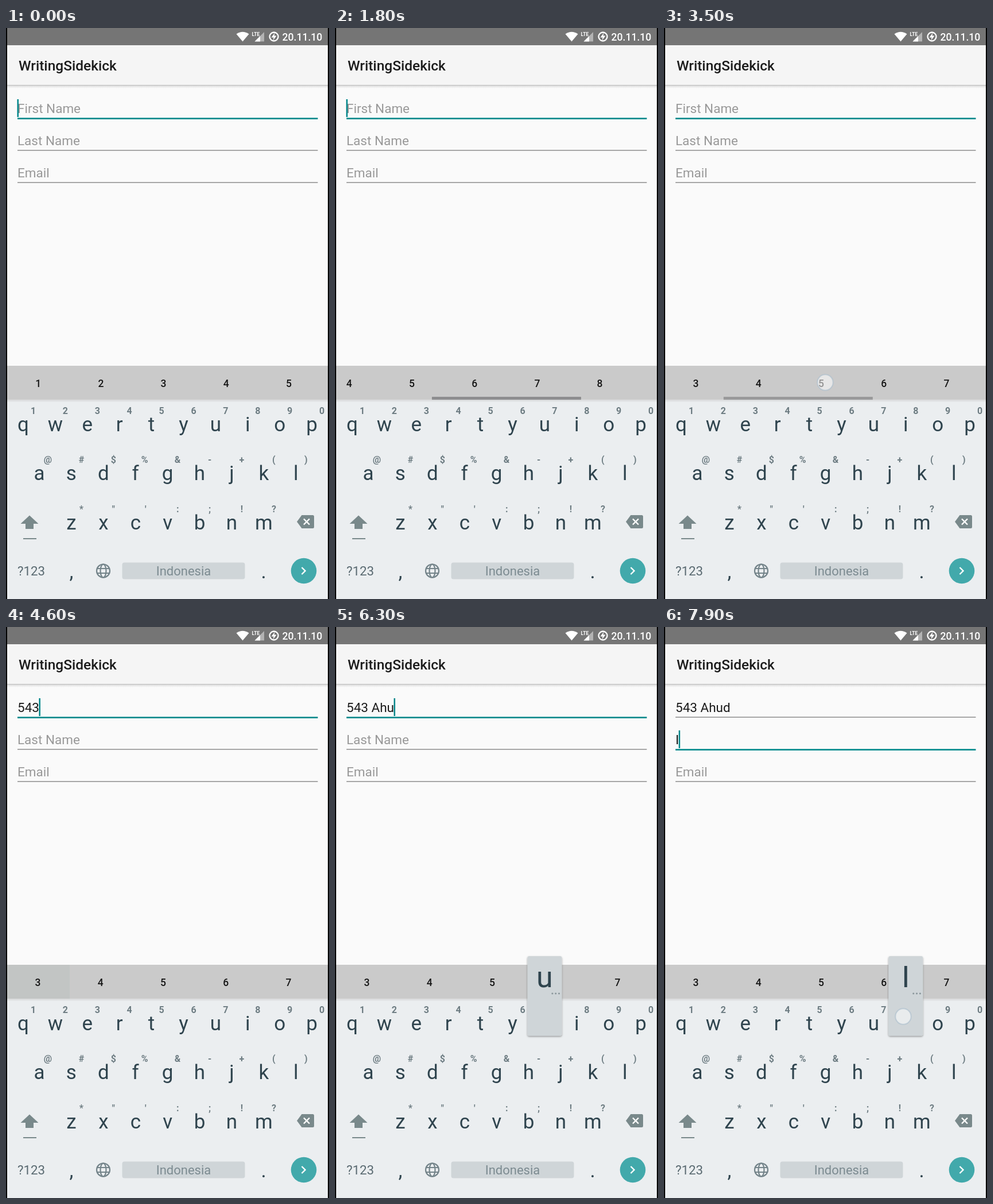
These frames come from a looping animation (563x994 px, 8 s). An HTML page:

```html
<!DOCTYPE html>
<html lang="en">
<head>
<meta charset="utf-8">
<title>Form with keyboard</title>
<style>
html, body { margin: 0; width: 100%; height: 100%; overflow: hidden; background: #000; }
svg { display: block; width: 100vw; height: 100vh; font-family: Roboto, sans-serif; }
text { white-space: pre; }
.mid { text-anchor: middle; }
.edit { font-size: 22.5px; }
.key { font-size: 35px; fill: #2f444e; }
.hint { font-size: 16px; font-weight: 700; fill: #6d7c82; }
.tip { font-size: 17.5px; font-weight: 500; fill: #161616; }
</style>
</head>
<body>
<svg id="stage" viewBox="0 0 563 994" preserveAspectRatio="none">
  <defs>
    <linearGradient id="barShade" x2="0" y2="1">
      <stop offset="0" stop-color="#bdbdbd"/><stop offset=".4" stop-color="#e4e4e4"/><stop offset="1" stop-color="#fafafa"/>
    </linearGradient>
    <linearGradient id="keyShade" x2="0" y2="1">
      <stop offset="0" stop-color="#d6d7d8"/><stop offset="1" stop-color="#ebeef0"/>
    </linearGradient>
    <filter id="drop" x="-20%" y="-20%" width="140%" height="140%">
      <feDropShadow dx="0" dy="1.5" stdDeviation="1.6" flood-opacity=".4"/>
    </filter>
    <clipPath id="stripBox"><rect x="2" y="588" width="559" height="60"/></clipPath>
  </defs>
  <rect width="563" height="994"/>
  <rect x="2" width="559" height="994" fill="#fafafa"/>
  <rect x="2" width="559" height="30" fill="#757575"/>
  <rect x="2" y="30" width="559" height="69" fill="#f5f5f5"/>
  <rect x="2" y="99" width="559" height="6" fill="url(#barShade)"/>

  <g fill="#fff">
    <path d="M401.5 10.5Q412.500 3 423.500 10.500L412.500 23.500Z"/>
    <text x="428.500" y="13.500" font-size="8.500" font-weight="700">LTE</text>
    <path d="M450 7V23.500H433.500Z" opacity=".45"/>
    <path d="M443 14V23.500H433.500Z"/>
    <circle cx="467" cy="15" r="7.500" fill="none" stroke="#fff" stroke-width="2.300"/>
    <path d="M468.500 8.500L462.500 16.500H466.500L465.500 21.500L471.500 13.500H467.500Z"/>
    <text x="481.500" y="22" font-size="17.600" font-weight="500">20.11.10</text>
  </g>
  <text x="22" y="74" font-size="24.500" font-weight="500" fill="#1c1c1c">WritingSidekick</text>

  <g id="fields"></g>
  <rect id="caret" width="2.500" height="31" fill="#00868a"/>

  <rect x="2" y="588" width="559" height="59.500" fill="#cacaca"/>
  <g clip-path="url(#stripBox)">
    <rect id="pressed" y="588" width="109" height="59.500" fill="#c2c5c4"/>
    <g id="tips"></g>
    <rect id="thumb" y="642" width="260" height="5.500" fill="#8d8d8f"/>
  </g>

  <rect x="2" y="647.500" width="559" height="346.500" fill="#ebeef0"/>
  <rect x="2" y="647.500" width="559" height="4" fill="url(#keyShade)"/>
  <g id="keys"></g>
  <g id="shift" fill="#79898b">
    <path d="M41 848.500L56.500 863H48V872H34V863H25.500Z"/>
    <rect x="30" y="888" width="23" height="2"/>
  </g>
  <path d="M507 859.500L515.500 848H534.500Q537 848 537 850.500V868.500Q537 871 534.500 871H515.500Z" fill="#79898b"/>
  <path d="M519 854.500L529 864.500M529 854.500L519 864.500" stroke="#fff" stroke-width="2.400"/>
  <text x="20" y="953" font-size="22.300" fill="#5a6a71">?123</text>
  <g fill="none" stroke="#74848a" stroke-width="2.200">
    <circle cx="169.500" cy="945" r="11.500"/>
    <ellipse cx="169.500" cy="945" rx="5" ry="11.500"/>
    <path d="M159 941H180M159 949H180"/>
  </g>
  <rect x="202.500" y="930.500" width="214" height="29" rx="4" fill="#cfd5d8"/>
  <text class="mid" x="309.500" y="952.500" font-size="22" fill="#7c8b91">Indonesia</text>
  <circle cx="519" cy="945" r="22.300" fill="#42a9ab"/>
  <path d="M515.500 939L521.500 945L515.500 951" fill="none" stroke="#fff" stroke-width="2.400"/>

  <g id="popups"></g>
  <g id="touches"></g>
</svg>
<script>
const LOOP = 8000, STEP = 55.9, ROW = 85.3, ITEM = 109.2;
const $ = id => document.getElementById(id);

function add(parent, tag, attrs, text) {
  const el = document.createElementNS('http://www.w3.org/2000/svg', tag);
  for (const k in attrs) el.setAttribute(k, attrs[k]);
  if (text !== undefined) el.textContent = text;
  return parent.appendChild(el);
}
const set = (el, attrs) => { for (const k in attrs) el.setAttribute(k, attrs[k]); };
const show = (el, on) => el.setAttribute('visibility', on ? 'visible' : 'hidden');
const within = (t, a, b) => t >= a && t < b;

// Latest value of a table of [time, value] steps
function latest(steps, t) {
  let v = steps[0][1];
  for (const [at, val] of steps) if (t >= at) v = val;
  return v;
}
function ramp(points, t) {
  if (t <= points[0][0]) return points[0][1];
  for (let i = 1; i < points.length; i++) {
    const [a, u] = points[i - 1], [b, v] = points[i];
    if (t < b) return u + (v - u) * (t - a) / (b - a);
  }
  return points[points.length - 1][1];
}

// Form
const fields = ['First Name', 'Last Name', 'Email'].map((label, i) => ({
  label,
  text: add($('fields'), 'text', { class: 'edit', x: 20, y: 148 + i * 56 }),
  line: add($('fields'), 'rect', { x: 20, width: 523.5 })
}));
const typed = [
  [[0, ''], [3700, '5'], [4000, '54'], [4400, '543'], [5400, '543 '],
   [5800, '543 A'], [6100, '543 Ah'], [6300, '543 Ahu'], [6500, '543 Ahud']],
  [[0, ''], [7900, 'I']],
  [[0, '']]
];
// Moments at which the caret starts a fresh blink
const caretStarts = [-300, 3700, 4000, 4400, 5400, 5800, 6100, 6300, 6500, 7000, 7900].map(v => [v, v]);

// Suggestion strip
for (let i = 0; i < 11; i++)
  add($('tips'), 'text', { class: 'tip mid', x: 56.2 + i * ITEM, y: 625 }, i + 1);
const scroll = [[900, 0], [1000, 40], [1300, 235], [1500, 320], [1650, 349], [1800, 359],
  [2200, 359], [2300, 348], [2600, 275], [2900, 232], [3200, 219]];
const presses = [[3650, 3800, 2], [3950, 4100, 1], [4250, 5400, 0]];

// Keyboard
const rows = [
  ['qwertyuiop', '1234567890', 30],
  ['asdfghjkl', '@#$%&-+()', 58],
  ['zxcvbnm', '*"\':;!?', 114]
];
const keyAt = {}, letters = [];
rows.forEach(([chars, hints, x0], r) => [...chars].forEach((ch, i) => {
  const x = x0 + i * STEP, y = 702 + r * ROW, h = hints[i];
  keyAt[ch] = [x, y];
  letters.push([ch, add($('keys'), 'text', { class: 'key mid', x, y }, ch)]);
  const dx = h === '@' ? 15 : h === '%' ? 16 : 17.5;
  add($('keys'), 'text', { class: 'hint mid', x: x + dx, y: y - 30 }, h);
}));
add($('keys'), 'text', { class: 'key mid', x: 114, y: 958 }, ',');
add($('keys'), 'text', { class: 'key mid', x: 449, y: 958 }, '.');

const popups = [[5700, 5900, 'A'], [6000, 6200, 'h'], [6200, 6350, 'u'], [6350, 6500, 'd'], [7800, 8000, 'I']]
  .map(([from, to, ch]) => {
    const [x, y] = keyAt[ch.toLowerCase()];
    const el = add($('popups'), 'g', { transform: `translate(${x} ${y - 129})` });
    add(el, 'rect', { x: -30, width: 60, height: 138.5, rx: 3, fill: '#cfd5d8', filter: 'url(#drop)' });
    add(el, 'text', { class: 'mid', y: 54, 'font-size': 52, fill: '#2f444e' }, ch);
    for (let i = 0; i < 3; i++)
      add(el, 'circle', { cx: 13.5 + i * 5.8, cy: 65, r: 1.6, fill: '#8b979c' });
    return { from, to, el };
  });

// Fingers: start, end, x, y, scroll offset they hold on to (if dragging)
const touches = [
  [900, 1450, 470, 617, 0], [2200, 2950, 200, 617, 359],
  [3500, 3700, 281, 617], [3850, 4000, 168, 617], [4200, 4400, 58, 617],
  [5400, 5500, 300, 956], [5500, 5620, 40, 862],
  [5700, 6000, 36, 788], [5900, 6100, 303, 776], [6200, 6300, 363, 690], [6350, 6500, 168, 776],
  [6800, 7000, 250, 198], [7600, 7720, 40, 862], [7800, 8000, 417, 678]
].map(([from, to, x, y, hold]) => ({
  from, to, x, hold,
  el: add($('touches'), 'circle', {
    cx: x, cy: y, r: 13.7, fill: '#fff', 'fill-opacity': .55,
    stroke: '#a9bccb', 'stroke-opacity': .6, 'stroke-width': 2
  })
}));

function render(t) {
  const focus = t >= 7000 ? 1 : 0;
  fields.forEach((f, i) => {
    const value = latest(typed[i], t), on = i === focus;
    f.text.textContent = value || f.label;
    f.text.setAttribute('fill', value ? '#1c1c1c' : '#999');
    set(f.line, {
      y: 156.3 + i * 56, height: on ? 2.6 : 1.4, fill: on ? '#00888a' : '#858585'
    });
    if (on) {
      const w = value ? f.text.getComputedTextLength() : 0;
      set($('caret'), { x: 19.5 + w, y: 124 + i * 56 });
    }
  });
  show($('caret'), (t - latest(caretStarts, t)) % 1000 < 500);

  const s = ramp(scroll, t);
  $('tips').setAttribute('transform', `translate(${-s} 0)`);
  set($('thumb'), {
    x: 2 + s * .465,
    opacity: ramp([[900, 0], [901, 1], [3450, 1], [3700, 0]], t)
  });
  const hit = presses.find(p => within(t, p[0], p[1]));
  show($('pressed'), hit);
  if (hit) $('pressed').setAttribute('x', 2 + hit[2] * ITEM);

  const caps = within(t, 5600, 5800) || within(t, 7700, 7900);
  for (const [ch, el] of letters) el.textContent = caps ? ch.toUpperCase() : ch;
  $('shift').setAttribute('fill', caps ? '#42a9ab' : '#79898b');

  for (const p of popups) show(p.el, within(t, p.from, p.to));
  for (const f of touches) {
    show(f.el, within(t, f.from, f.to));
    if (f.hold !== undefined) f.el.setAttribute('cx', f.x + f.hold - s);
  }
}

const start = performance.now();
function tick() {
  render((performance.now() - start) % LOOP);
  requestAnimationFrame(tick);
}
tick();
</script>
</body>
</html>
```
